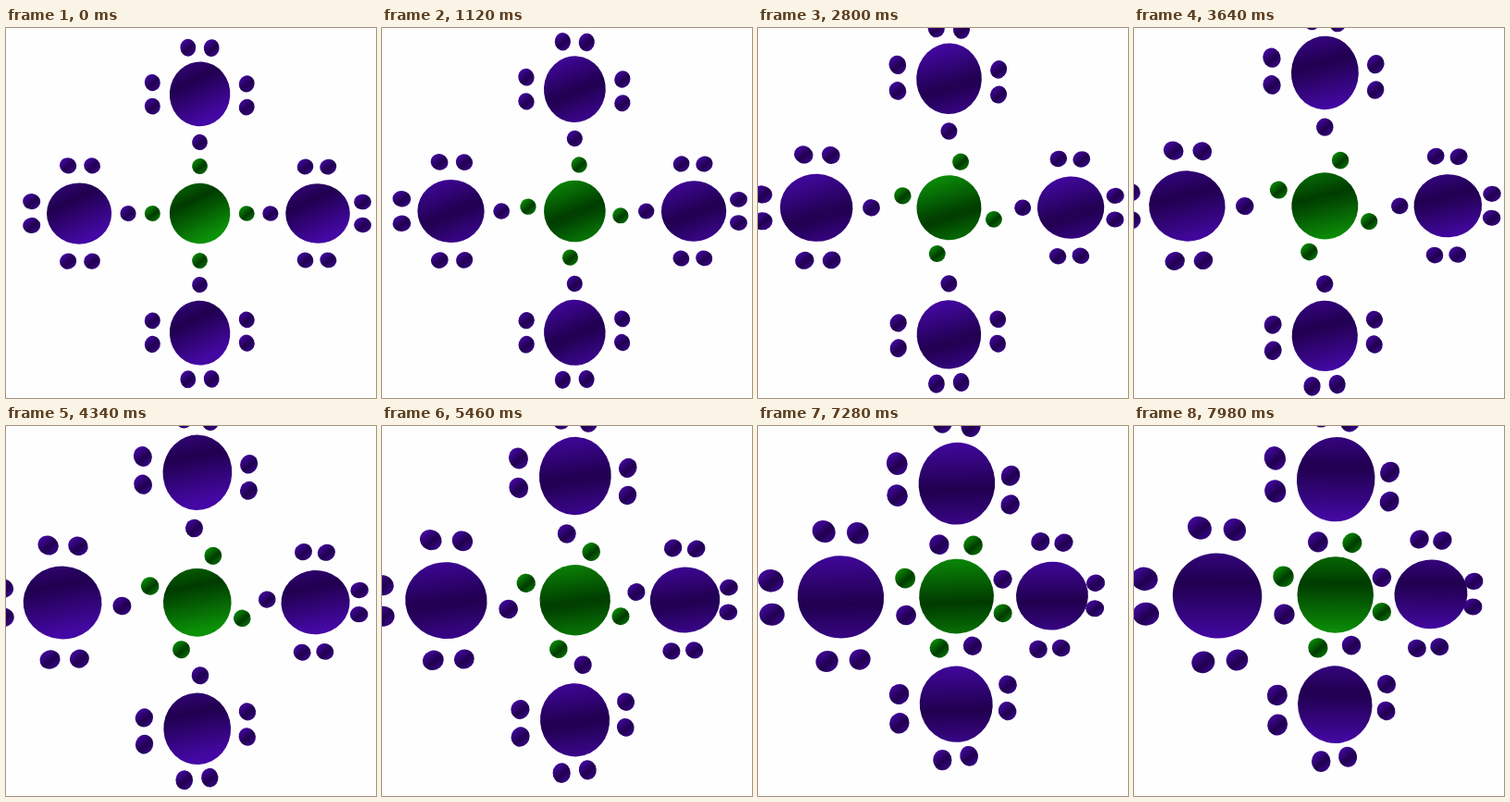
Write an HTML page with a canvas that moves like this. It is 400 px wide and 400 px high and loops after 8000 ms.

```html
<!DOCTYPE html>
<html lang="en">
<head>
<meta charset="utf-8">
<title>Shared electrons</title>
<style>
html, body { margin: 0; width: 100%; height: 100%; overflow: hidden; background: #fefefe; }
canvas { display: block; width: 400px; height: 400px; }
</style>
</head>
<body>
<canvas id="stage" width="400" height="400"></canvas>
<script>
const ctx = document.getElementById('stage').getContext('2d');
const { sin, cos, exp, sqrt, abs, PI } = Math;
const LOOP = 8000, STEP = 140, FOCAL = 346, RAD = PI / 180;
const BIG = 32.6, SMALL = 8.4, SHELL = 51, PAIR = 12.7;
const GREEN = { dark: [0, 58, 0], light: [12, 146, 8] };
const PURPLE = { dark: [32, 0, 78], light: [68, 8, 164] };

const clamp = v => Math.max(0, Math.min(1, v));

// The camera starts gently, then closes in and orbits at an even pace
function cameraAt(n) {
  const m = n * (1 - 0.8 * exp(-n / 17));
  return {
    x: 9.5 - 0.337 * m + 0.00868 * m * m,
    y: 0.5 - 0.31 * n,
    zoom: 1 + 0.0046 * m,
    yaw: (1.8 + 0.28 * m) * RAD,
    pitch: 0.075 * m * RAD
  };
}

// First the inner electrons turn aside, then the outer atoms move in to share them
function buildBalls(n) {
  const turn = clamp(n / 26), join = clamp((n - 26) / 26);
  const reach = 128 - 32.5 * join;
  const atomTexture = { band: 0.5 * cos(2 * PI * (n - 46) / 31), tilt: 0.45 - 0.008 * n };
  const electronTexture = { band: 0.2, tilt: 0.7 };
  const balls = [{ x: 0, y: 0, r: BIG, color: GREEN, ...atomTexture }];

  for (let i = 0; i < 4; i++) {
    const ux = cos(i * PI / 2), uy = sin(i * PI / 2);
    const add = (out, side, r, color, texture) => balls.push({
      x: ux * out - uy * side, y: uy * out + ux * side, r, color, ...texture
    });
    const electron = (out, side, color) => add(out, side, SMALL, color, electronTexture);

    add(reach, 0, BIG, PURPLE, atomTexture);
    electron(SHELL - 6 * turn, 15.5 * turn, GREEN);
    electron(reach - SHELL, -15.5 * join, PURPLE);
    for (const k of [-PAIR, PAIR]) {
      electron(reach + SHELL, k, PURPLE);
      electron(reach + k, SHELL, PURPLE);
      electron(reach + k, -SHELL, PURPLE);
    }
  }
  return balls;
}

// Outline of a sphere in perspective: an ellipse stretched away from the view axis
function project(ball, cam) {
  const z1 = ball.x * sin(cam.yaw);
  const x = cam.x + cam.zoom * ball.x * cos(cam.yaw);
  const y = cam.y + cam.zoom * (ball.y * cos(cam.pitch) - z1 * sin(cam.pitch));
  const z = FOCAL + cam.zoom * (ball.y * sin(cam.pitch) + z1 * cos(cam.pitch));
  const r = cam.zoom * ball.r, q = z * z - r * r;
  return {
    ball, z,
    x: 200 + FOCAL * x * z / q,
    y: 200 + FOCAL * y * z / q,
    along: FOCAL * r * sqrt(x * x + y * y + q) / q,
    across: FOCAL * r / sqrt(q),
    angle: Math.atan2(y, x)
  };
}

// A dark band across the sphere, brightening to both sides
function shade({ ball, x, y, across }) {
  const { dark, light } = ball.color;
  const dx = across * sin(ball.tilt), dy = across * cos(ball.tilt);
  const fill = ctx.createLinearGradient(x - dx, y - dy, x + dx, y + dy);
  for (let i = 0; i <= 12; i++) {
    const mix = clamp(abs(i / 6 - 1 - ball.band) / 1.35);
    fill.addColorStop(i / 12, `rgb(${dark.map((c, k) => Math.round(c + (light[k] - c) * mix))})`);
  }
  return fill;
}

function draw(n) {
  const cam = cameraAt(n);
  ctx.fillStyle = '#fefefe';
  ctx.fillRect(0, 0, 400, 400);
  const shapes = buildBalls(n).map(b => project(b, cam)).sort((a, b) => b.z - a.z);
  for (const p of shapes) {
    ctx.fillStyle = shade(p);
    ctx.beginPath();
    ctx.ellipse(p.x, p.y, p.along, p.across, p.angle, 0, 2 * PI);
    ctx.fill();
  }
}

const start = performance.now();
function tick() {
  draw(Math.floor((performance.now() - start) % LOOP / STEP));
  requestAnimationFrame(tick);
}
tick();
</script>
</body>
</html>
```
